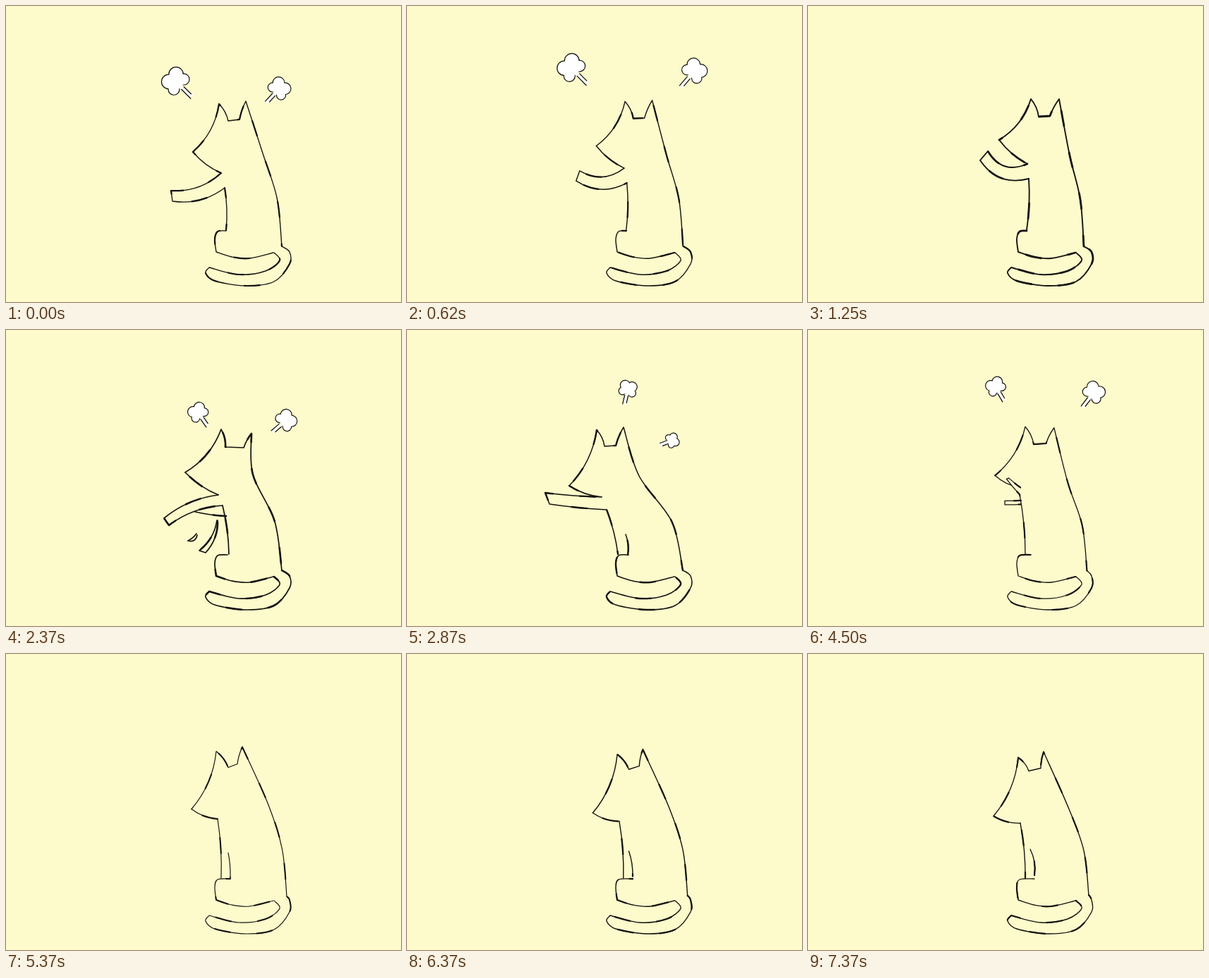
Write an HTML page with a canvas that moves like this. It is 560x420 px and loops after 8000 ms.

```html
<!DOCTYPE html>
<html lang="en">
<head>
<meta charset="utf-8">
<title>Boxing cat</title>
<style>
html, body { margin: 0; height: 100%; overflow: hidden; background: #fdfacb; }
canvas { display: block; }
</style>
</head>
<body>
<canvas id="stage" width="560" height="420"></canvas>
<script>
const ctx = document.getElementById('stage').getContext('2d');
const PAPER = '#fdfacb', INK = '#14130f';

// Joints of the cat. Hands are the two corners of a paw; bend sags the arm.
// Lines are x, y, x, y, bow; puffs are x, y, radius.
function pose(joints) {
  const { chin, chest } = joints, elbow = [303, 245];
  return {
    hip: [391, 341], hands: [chin, chest], bend: 0, lines: [],
    arm2: [elbow, elbow, elbow, elbow], bend2: 0,
    puffs: [[268, 112, 13], [388, 115, 13]], ...joints
  };
}

const poses = [
  pose({ nose: [265, 207], ear1: [302, 139], dip1: [315, 163], dip2: [331, 161], ear2: [340, 135],
    neck: [364, 209], chin: [305, 237], chest: [310, 258], leg: 312, paw: 312, weight: 1.6,
    hands: [[234, 262], [236, 277]], bend: 8, puffs: [[256, 122, 17], [373, 133, 14]] }),
  pose({ nose: [271, 190], ear1: [316, 132], dip1: [327, 157], dip2: [343, 156], ear2: [356, 132],
    neck: [371, 212], chin: [311, 224], chest: [313, 245], leg: 310, paw: 310, weight: 2.2,
    hands: [[255, 206], [244, 219]], bend: 13 }),
  pose({ nose: [254, 202], ear1: [305, 141], dip1: [311, 166], dip2: [337, 167], ear2: [348, 147],
    neck: [350, 205], chin: [301, 234], chest: [307, 249], leg: 316, paw: 314, weight: 2,
    hands: [[224, 267], [231, 277]], bend: -6,
    arm2: [[299, 270], [274, 313], [283, 316], [300, 270]], bend2: 5,
    lines: [[268, 258, 312, 264, 1], [258, 299, 270, 289, 1], [258, 299, 271, 291, 4]],
    puffs: [[273, 118, 15], [396, 129, 16]] }),
  pose({ nose: [230, 221], ear1: [269, 142], dip1: [280, 165], dip2: [296, 164], ear2: [307, 138],
    neck: [329, 207], chin: [276, 237], chest: [283, 255], leg: 299, paw: 314, weight: 1.8,
    hands: [[196, 231], [202, 247]], bend: 1, lines: [[310, 290, 313, 319, -2]],
    puffs: [[313, 85, 14], [375, 157, 11]] }),
  pose({ nose: [269, 167], ear1: [325, 121], dip1: [330, 155], dip2: [349, 160], ear2: [373, 138],
    neck: [366, 210], chin: [301, 195], chest: [299, 223], leg: 308, paw: 308, weight: 1.8,
    hands: [[243, 149], [230, 154]], bend: 2,
    arm2: [[301, 236], [251, 237], [251, 249], [301, 250]],
    puffs: [[291, 76, 12], [399, 91, 16]] }),
  pose({ nose: [263, 220], ear1: [298, 138], dip1: [315, 161], dip2: [328, 156], ear2: [335, 132],
    neck: [372, 214], chin: [300, 234], chest: [300, 234], leg: 305, paw: 318, weight: 1.4,
    hip: [398, 344], lines: [[315, 282, 318, 317, -1]] }),
  pose({ nose: [263, 230], ear1: [298, 147], dip1: [313, 166], dip2: [330, 162], ear2: [334, 139],
    neck: [370, 220], chin: [301, 240], chest: [301, 240], leg: 308, paw: 321, weight: 1.6,
    hip: [398, 342], lines: [[315, 277, 321, 314, -3]] })
];

// [step, pose]: the boxing, then slow breathing with pauses.
const keys = [[0, 0], [10, 1], [19, 2], [23, 3], [31, 4], [39, 6], [43, 5], [45, 5],
  [49, 6], [53, 5], [55, 5], [59, 6], [64, 6]];

const noise = n => (Math.sin(n * 127.1) * 43758.5453 % 1) / 2;

// Blends numbers, lists and objects, with a little hand-drawn wobble on the way.
function blend(a, b, u) {
  if (u === 0) return a;
  if (typeof a === 'number') return a + (b - a) * u + noise(a + 3 * b + 50 * u);
  if (Array.isArray(a)) return a.slice(0, b.length).map((v, i) => blend(v, b[i], u));
  return Object.fromEntries(Object.keys(a).map(k => [k, blend(a[k], b[k], u)]));
}

// A line from p to q whose middle is pushed sideways by d.
function bow(path, p, q, d) {
  const dx = q[0] - p[0], dy = q[1] - p[1], k = 2 * d / (Math.hypot(dx, dy) || 1);
  path.quadraticCurveTo((p[0] + q[0]) / 2 - dy * k, (p[1] + q[1]) / 2 + dx * k, ...q);
}

function spline(path, pts) {
  path.lineTo(...pts[0]);
  pts.slice(1).forEach((q, i) => {
    const p = pts[i], before = pts[i - 1] || p, after = pts[i + 2] || q;
    path.bezierCurveTo(
      p[0] + (q[0] - before[0]) / 6, p[1] + (q[1] - before[1]) / 6,
      q[0] - (after[0] - p[0]) / 6, q[1] - (after[1] - p[1]) / 6, ...q);
  });
}

// A thin line with heavier stretches, like a brush pen.
function ink(weight, seed, build) {
  const path = new Path2D();
  build(path);
  ctx.strokeStyle = INK;
  ctx.lineWidth = weight * 0.85;
  ctx.stroke(path);
  ctx.lineWidth = weight + 0.6;
  ctx.setLineDash([22, 38]);
  ctx.lineDashOffset = seed * 17;
  ctx.stroke(path);
  ctx.setLineDash([]);
}

function limb([rootA, handA, handB, rootB], bend, punch, weight, seed) {
  if (Math.hypot(handA[0] - rootA[0], handA[1] - rootA[1]) < 3) return;
  const reach = hand => hand.map((v, i) => rootA[i] + (v - rootA[i]) * (1 + punch));
  const a = reach(handA), b = reach(handB);
  ink(weight, seed, path => {
    path.moveTo(...rootA);
    bow(path, rootA, a, -bend);
    path.lineTo(...b);
    bow(path, b, rootB, bend);
    ctx.fillStyle = PAPER;
    ctx.fill(path);
  });
}

function drawCat(c, punch, step) {
  const { nose, ear1, dip1, dip2, ear2, neck, hip, chin, chest, weight: w } = c;
  const back = [(neck[0] + hip[0]) / 2 + (hip[0] - neck[0]) / 4, (neck[1] + hip[1]) / 2 - 2];
  ink(w, step, path => {
    path.moveTo(...nose);
    bow(path, nose, ear1, 7);
    bow(path, ear1, dip1, -2);
    path.lineTo(...dip2);
    bow(path, dip2, ear2, -1);
    spline(path, [ear2, neck, back, hip]);
  });
  ink(w, step + 1, path => {
    path.moveTo(...nose);
    bow(path, nose, chin, 3);
  });
  ink(w, step + 2, path => {
    spline(path, [hip, [402, 349], [402, 366], [380, 391], [340, 397], [296, 390], [283, 379], [288, 371]]);
    spline(path, [[288, 371], [330, 381], [368, 376], [388, 361], [380, 350]]);
  });
  ink(w, step + 3, path => {
    spline(path, [[c.paw, 319], [300, 320], [296, 331], [298, 349]]);
    spline(path, [[298, 349], [320, 356], [345, 358], [379, 350]]);
  });
  for (const [x1, y1, x2, y2, d] of c.lines) {
    ink(w, step, path => {
      path.moveTo(x1, y1);
      bow(path, [x1, y1], [x2, y2], d);
    });
  }
  limb(c.arm2, c.bend2, -punch, w, step);
  limb([chin, ...c.hands, chest], c.bend, punch, w, step);
  ink(w, step + 4, path => {
    path.moveTo(...chest);
    bow(path, chest, [c.leg, 318], -2);
  });
}

// A puff of steam flying away from the head.
function drawPuff([x, y, r], { dip1, dip2 }, age) {
  const dir = Math.atan2(y - dip1[1] - 25, x - (dip1[0] + dip2[0]) / 2);
  const s = r * (1 + 0.2 * age);
  ctx.save();
  ctx.translate(x + Math.cos(dir) * 20 * age, y + Math.sin(dir) * 20 * age);
  ctx.rotate(dir);
  const lobes = (color, grow) => {
    ctx.fillStyle = color;
    ctx.beginPath();
    for (const t of [-2, -0.73, 0.73, 2]) {
      const size = s * (0.57 - Math.abs(t) * 0.09) + grow;
      const cx = Math.cos(t) * s * 0.54, cy = Math.sin(t) * s * 0.54;
      ctx.moveTo(cx + size, cy);
      ctx.arc(cx, cy, size, 0, 7);
    }
    ctx.fill();
  };
  lobes(INK, 0.6);
  lobes('#fff', -0.6);
  ctx.fillRect(-s * 0.45, -s * 0.4, s * 0.9, s * 0.8);
  ctx.fillRect(-s * 1.5, -3, s, 6);
  ctx.strokeStyle = INK;
  ctx.lineWidth = 1.3;
  ctx.beginPath();
  for (const side of [-1, 1]) {
    ctx.moveTo(-s * 0.6, side * 2.5);
    ctx.lineTo(-s * (1.4 - side * 0.1), side * 2.5);
  }
  ctx.stroke();
  ctx.restore();
}

function draw(step) {
  ctx.fillStyle = PAPER;
  ctx.fillRect(0, 0, 560, 420);
  ctx.lineCap = ctx.lineJoin = 'round';

  const i = keys.findIndex((key, n) => step < keys[n + 1][0]);
  const [start, from] = keys[i], [end, to] = keys[i + 1];
  const u = from === to ? 0 : (step - start) / (end - start);
  const cat = blend(poses[from], poses[to], u);
  const punches = Math.round((end - start) / 5);
  drawCat(cat, -0.25 * Math.sin(2 * Math.PI * punches * u), u ? step : from);

  const age = (step + 1) % 4;
  if (step < 39 && age < 3) cat.puffs.forEach(p => drawPuff(p, cat, age));
}

const t0 = performance.now();
let shown = -1;
function tick(now) {
  const t = Math.max(0, now - t0) % 8000;
  // Eight drawings a second, on a clock of hundredths.
  const step = Math.floor((Math.floor(t / 10) + 0.5) / 12.5);
  if (step !== shown) draw(shown = step);
  requestAnimationFrame(tick);
}
tick(t0);
</script>
</body>
</html>
```
